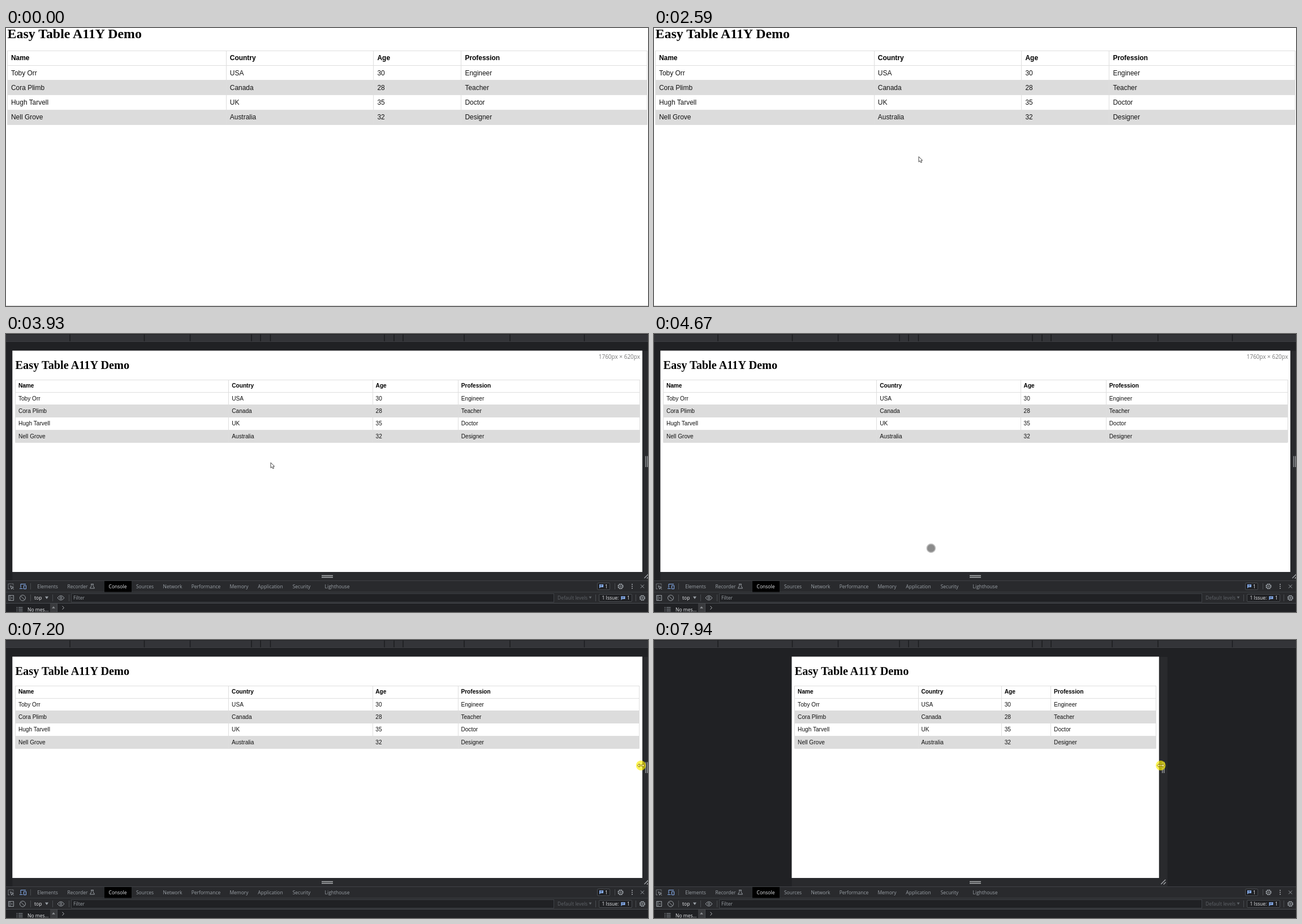
These frames come from a looping animation (1135 px wide and 493 px high, 8000 ms). An HTML page:

```html
<!DOCTYPE html>
<html lang="en">
<head>
<meta charset="utf-8">
<title>Easy Table A11Y Demo</title>
<style>
html, body { margin: 0; width: 100%; height: 100%; overflow: hidden; background: #fff; }
svg { display: block; width: 1135px; height: 493px; }
.cell { font-family: "Liberation Sans", Arial, sans-serif; fill: #111; }
.head { font-weight: bold; fill: #000; }
.title { font-family: "Liberation Serif", "Times New Roman", serif; font-weight: bold; fill: #000; }
.ui { font-family: "Open Sans", "Noto Sans", sans-serif; font-size: 8.5px; fill: #9aa0a6; }
.mid { text-anchor: middle; }
.lit { fill: #e8eaed; }
.dim { fill: #5f6368; }
.icon { fill: none; stroke: #9aa0a6; stroke-width: 1; }
.blue { stroke: #8ab4f8; }
.sep { stroke: #494c50; stroke-width: 1; }
</style>
</head>
<body>
<svg id="stage" viewBox="0 0 1135 493"></svg>
<script>
const LOOP = 8000;
const NS = 'http://www.w3.org/2000/svg';
const stage = document.getElementById('stage');

function add(parent, tag, attrs = {}, text) {
  const el = document.createElementNS(NS, tag);
  set(el, attrs);
  if (text) el.textContent = text;
  parent.append(el);
  return el;
}
function set(el, attrs) {
  for (const k in attrs) el.setAttribute(k, attrs[k]);
}
const group = parent => add(parent, 'g');
const box = (p, x, y, width, height, fill, more) => add(p, 'rect', { x, y, width, height, fill, ...more });
const path = (p, d, cls = 'icon', more) => add(p, 'path', { d, class: cls, ...more });
const label = (p, x, y, text, cls = '') => add(p, 'text', { x, y, class: 'ui ' + cls }, text);
const show = (el, on) => el.setAttribute('display', on ? 'inline' : 'none');

// Dark frame around the page
const frame = group(stage);
box(frame, 0, 0, 1135, 493, '#202124');
box(frame, 0, 1, 1135, 12, '#333438');
box(frame, 0, 13, 1135, 1, '#3c3d41');
for (const x of [113, 244.5, 325.5, 434, 450, 467.5, 669, 686, 702, 810, 891, 1022.5])
  box(frame, x - .7, 1, 1.4, 12, '#1b1c1f');
const strip = box(frame, 11, 30, 1129, 407, '#292a2d');
const grips = group(frame);
path(grips, 'M6 216.5v19.5M9 216.5v19.5M3.5 433l8-8M8 433.5l4-4', 'icon', { style: 'stroke:#a5a8ac;stroke-width:1.3' });
path(frame, 'M558 428.5h20M558 431.5h20', 'icon', { style: 'stroke:#b4b6b9;stroke-width:1.3' });

// Page with the table
const page = group(stage);
const sheet = box(page, 0, 0, 1135, 493, '#fff');
const title = add(page, 'text', { class: 'title' }, 'Easy Table A11Y Demo');
const bands = [2, 4].map(i => ({ i, el: box(page, 0, 0, 1, 1, '#dcdcdc') }));
const grid = add(page, 'path', { fill: 'none', stroke: '#dedede', 'stroke-width': 1 });
const DATA = [
  ['Name', 'Country', 'Age', 'Profession'],
  ['Toby Orr', 'USA', '30', 'Engineer'],
  ['Cora Plimb', 'Canada', '28', 'Teacher'],
  ['Hugh Tarvell', 'UK', '35', 'Doctor'],
  ['Nell Grove', 'Australia', '32', 'Designer']
];
const COLS = [0, .342, .5725, .7095, 1];
const cells = DATA.map((row, r) => row.map(s => add(page, 'text', { class: r ? 'cell' : 'cell head' }, s)));
const sizeNote = add(page, 'text', { x: 1121, y: 43.5, class: 'ui', style: 'font-size:10px;fill:#777;text-anchor:end' }, '1760px × 620px');
const baseLine = box(stage, 0, 492, 1135, 1, '#cbcbcb');

function layTable({ left, right, top, head, rowH, size, big, pad }) {
  const w = right - left, bottom = top + rowH * 5;
  const colX = COLS.map(f => Math.round(left + w * f - .5) + .5);
  const rowY = [0, 1, 2, 3, 4, 5].map(i => Math.round(top + rowH * i - .5) + .5);
  set(title, { x: left, y: head, 'font-size': big });
  set(grid, { d: rowY.map(y => `M${left} ${y}H${right}`).join('') + colX.map(x => `M${x} ${top}V${bottom}`).join('') });
  for (const b of bands) set(b.el, { x: left, y: rowY[b.i], width: w, height: rowY[b.i + 1] - rowY[b.i] });
  cells.forEach((row, r) => row.forEach((el, c) => set(el, {
    x: left + w * COLS[c] + pad,
    y: top + rowH * (r + .5) + size * .358 - .3,
    'font-size': size
  })));
}

// Developer panel
const panel = group(stage);
box(panel, 0, 437, 1135, 21, '#292a2d');
box(panel, 0, 437, 1135, 1, '#3f4145');
box(panel, 0, 457.5, 1135, 1, '#494c50');

const tabs = group(panel);
box(tabs, 174, 438, 48, 19.5, '#000');
const TABS = { Elements: 73.5, Recorder: 126.5, Console: 197.5, Sources: 245.5, Network: 294.5, Performance: 353.5,
  Memory: 412, Application: 467.5, Security: 522.5, Lighthouse: 585.5 };
for (const name in TABS) label(tabs, TABS[name], 451, name, name === 'Console' ? 'mid lit' : 'mid');
path(tabs, 'M150 443.5h5M151 443.5v3l-2.5 4.5h8l-2.500-4.5v-3');

const gear = (p, x, y) => {
  add(p, 'circle', { cx: x, cy: y, r: 4.4, class: 'icon', style: 'stroke-width:1.5;stroke-dasharray:2.3 1.15' });
  add(p, 'circle', { cx: x, cy: y, r: 3.6, class: 'icon' });
  add(p, 'circle', { cx: x, cy: y, r: 1.3, class: 'icon' });
};
const badge = (p, x, y) => {
  path(p, `M${x} ${y - 3}h7v5h-5l-2 2z`, '', { fill: '#8ab4f8' });
  path(p, `M${x + 1.5} ${y - 1.500}h4M${x + 1.5} ${y + .3}h3`, '', { stroke: '#202124', 'stroke-width': .7 });
};

const icons = group(panel);
path(icons, 'M4 452v-9h9v3M4 452h3', 'icon', { 'stroke-dasharray': '1.5 1' });
path(icons, 'M7.500 446.500l6 2.500-2.500 1-1 2.500zM11 450l3 3');
path(icons, 'M26 450v-6.500h9M24 451.500h5.500M31.500 446h4v6h-4z', 'icon blue', { 'stroke-width': 1.3 });
path(icons, 'M43.500 442v11M1076.500 442v11', 'sep');
box(icons, 1045.500, 441.500, 22, 12, '#202124', { stroke: '#494c50', rx: 1.5 });
badge(icons, 1049, 447);
label(icons, 1059, 450.500, '1', 'lit');
gear(icons, 1086.500, 447.500);
for (const y of [444, 447.500, 451]) add(icons, 'circle', { cx: 1107, cy: y, r: 1, fill: '#a5a8ac' });
path(icons, 'M1122 444.500l6 6M1128 444.500l-6 6');

const tools = group(panel);
box(tools, 0, 458.500, 1135, 19, '#292a2d');
box(tools, 0, 477, 1135, 1, '#494c50');
path(tools, 'M4.500 463.500h9v9h-9zM7 463.500v9M11.500 466l-2 2 2 2');
path(tools, 'M26 464.500l7 7');
add(tools, 'circle', { cx: 29.500, cy: 468, r: 5, class: 'icon' });
path(tools, 'M43.500 462v12M82.500 462v12M111.500 462v12M1042.500 462v12M1113.500 462v12', 'sep');
label(tools, 50, 471, 'top', 'lit');
path(tools, 'M69 465.500h6l-3 4.500z', '', { fill: '#9aa0a6' });
path(tools, 'M91 468q6-8 12 0q-6 8-12 0z');
add(tools, 'circle', { cx: 97, cy: 468, r: 1.8, class: 'icon' });
box(tools, 115.500, 460.500, 853, 15, '#202124', { stroke: '#3f4246' });
label(tools, 119, 471.300, 'Filter');
label(tools, 975, 471, 'Default levels', 'dim');
path(tools, 'M1030.500 465.500h5l-2.500 4z', '', { fill: '#5f6368' });
box(tools, 1048.500, 461.500, 58, 13, '#202124', { stroke: '#494c50', rx: 1.5 });
label(tools, 1053.500, 471, '1 Issue:', 'lit');
badge(tools, 1087.500, 468);
label(tools, 1098, 471, '1', 'lit');
gear(tools, 1125, 468);

const consoleBody = group(panel);
path(consoleBody, 'M18.500 485h2M18.500 488h2M18.500 491h2M22 485h7.500M22 488h7.500M22 491h7.500');
label(consoleBody, 38, 491.500, 'No mes...', 'lit');
box(consoleBody, 78, 478, 12, 15, '#3a3b3e');
path(consoleBody, 'M81 486.500h6l-3-3.500z', '', { fill: '#8d9094' });
path(consoleBody, 'M90.500 478v15', 'sep');
path(consoleBody, 'M99.500 482.500l3 3-3 3', 'icon', { style: 'stroke:#b5b8bc' });
const caret = box(consoleBody, 109, 480, 1, 11, '#e8eaed');

// Pointers, each drawn around its hot spot
const arrow = path(stage, 'M.5.5V10L2.700 8 4.300 11.300 6 10.500 4.500 7.400H7.200Z', '', { fill: '#fff', stroke: '#333', 'stroke-width': .9 });
const touch = add(stage, 'circle', { r: 7.500, fill: '#8b8b8b', stroke: '#bdbdbd', 'stroke-width': 1.6 });
const resize = group(stage);
const glow = add(resize, 'circle', { r: 8.700, fill: '#fff000', 'fill-opacity': .66 });
path(resize, 'M-6.500 0L-3-3V-1H3V-3L6.500 0 3 3V1H-3V3Z', '', { fill: '#fff5a0', stroke: '#7a6500', 'stroke-width': .8 });

// time, x, y
const ARROW = [
  [120, 975, 478], [190, 838, 448], [260, 688, 352], [330, 600, 286], [390, 583, 272],
  [1330, 583, 272], [1400, 500, 243], [1460, 467.500, 227.500]
];
const TOUCH = [
  [4190, 475, 227], [4260, 607, 205], [4330, 800, 220], [4400, 945, 318], [4530, 820, 400], [4600, 660, 407],
  [4670, 490.500, 380.500], [4800, 405, 300], [4940, 441, 158], [5010, 441, 158], [5200, 400, 70], [5460, 352, 62],
  [5730, 352, 62], [5860, 640, 120], [6070, 1058, 206], [6250, 1058, 206], [6790, 1122.500, 222.500]
];
const EDGES = [1125, 1115, 1085, 1040, 1007.500, 993, 969, 935, 908, 892.800];
const DRAG = 7200, TICK = 66.6;

function along(keys, t) {
  const i = keys.findIndex(k => k[0] > t);
  if (i < 0) return keys[keys.length - 1].slice(1);
  if (i === 0) return keys[0].slice(1);
  const [a, b] = [keys[i - 1], keys[i]], f = (t - a[0]) / (b[0] - a[0]);
  return [1, 2].map(n => a[n] + (b[n] - a[n]) * f);
}
const edgeAt = step => EDGES[Math.max(0, Math.min(EDGES.length - 1, step))];
const place = (el, [x, y]) => set(el, { transform: `translate(${x} ${y})` });

function drawPage(t, step) {
  if (t < 3520) {
    set(sheet, { x: 0, y: 0, width: 1135, height: 493 });
    layTable({ left: 2.500, right: 1133.500, top: 40.300, head: 18, rowH: 26.200, size: 11.950, big: 23.900, pad: 6.500 });
    return;
  }
  // The page repaints two ticks behind the pointer, its frame one tick behind
  const right = edgeAt(step - 2), left = 1136.300 - right, rim = edgeAt(step - 1);
  set(sheet, { x: left, y: 29.500, width: right - left, height: 392.500 });
  set(strip, { x: 1136.300 - rim, width: rim * 2 - 1136.300 + 15 });
  place(grips, [rim, 0]);
  if (t < 3860)
    layTable({ left: 17.500, right: 1118.500, top: 90.300, head: 68, rowH: 26.200, size: 11.950, big: 23.900, pad: 6.500 });
  else
    layTable({ left: left + 5.300, right: t < 4810 ? 1120 : right - 5.500, top: 81, head: 62, rowH: 22.270, size: 10.150, big: 20.300, pad: 5.300 });
}

function render(t) {
  const dark = t >= 3520, step = Math.floor((t - DRAG) / TICK);
  show(frame, dark);
  show(panel, dark);
  show(baseLine, !dark);
  show(tabs, t >= 3590);
  show(icons, t >= 3660);
  show(tools, t >= 3730);
  show(consoleBody, t >= 3800);
  show(sizeNote, t >= 3860 && t < 4810);
  show(caret, t >= 4140 && (t - 4140) % 1060 < 530);
  drawPage(t, step);

  show(arrow, t >= 120 && t < 4190);
  show(touch, t >= 4190 && t < 6720);
  show(resize, t >= 6720);
  show(glow, t >= 7070);
  place(arrow, along(ARROW, t));
  place(touch, along(TOUCH, t));
  place(resize, step < 1 ? along(TOUCH, t) : [edgeAt(step) + 3, 222.500]);
}

const start = performance.now();
function tick() {
  render((performance.now() - start) % LOOP);
  requestAnimationFrame(tick);
}
tick();
</script>
</body>
</html>
```
